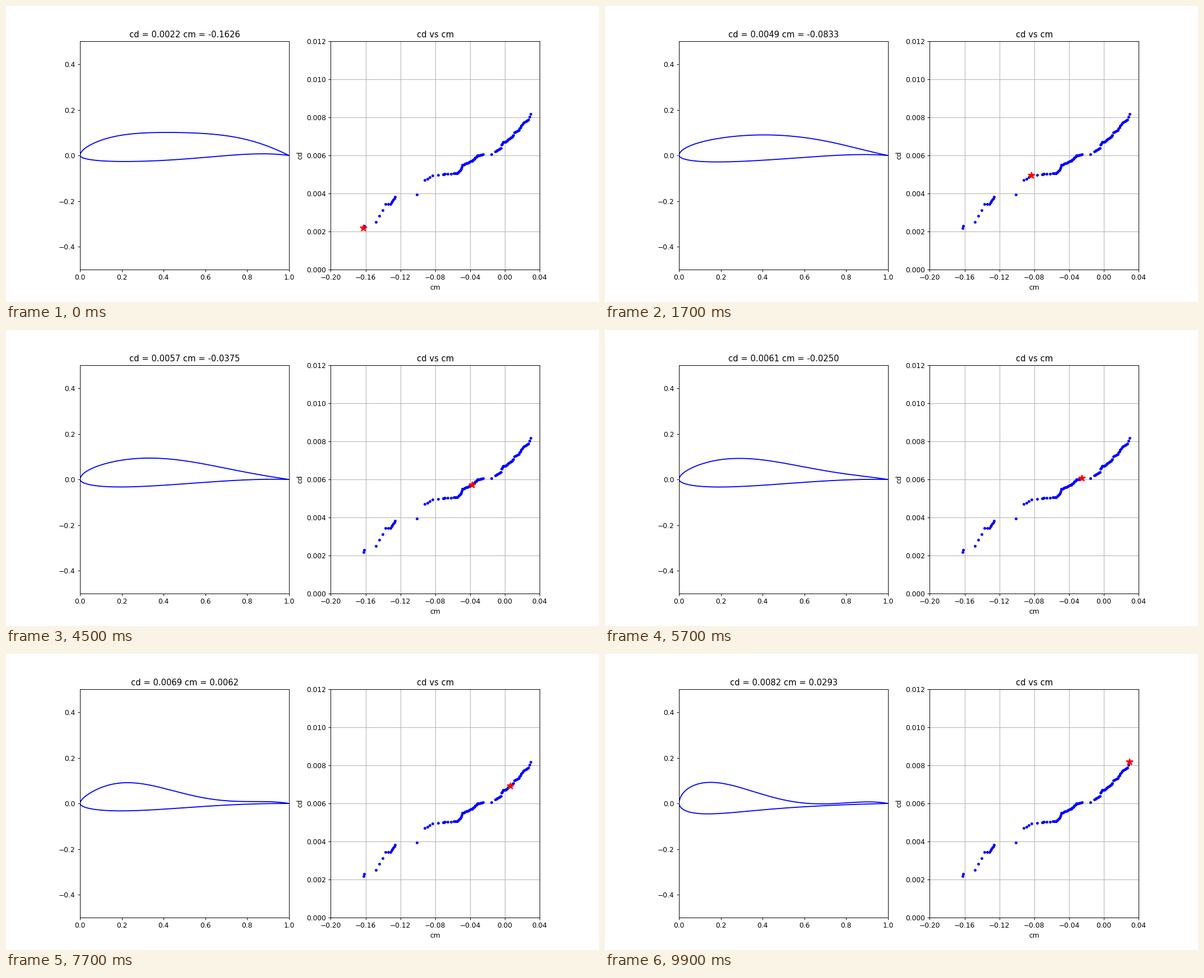
A matplotlib script for the animation above (10 s loop, 1058x529 px).

```python
import numpy as np
import matplotlib.pyplot as plt
from matplotlib.animation import FuncAnimation

FRAMES = 100

# Corners of the Pareto front: (index, cm in 1e-4, cd in 1e-5);
# the points in between are evenly spaced.
CORNERS = np.array([
    (0, -1626, 218), (1, -1618, 230), (2, -1483, 251), (5, -1369, 343),
    (7, -1313, 345), (12, -1261, 381), (13, -1012, 394), (14, -921, 470),
    (17, -833, 493), (19, -706, 500), (22, -689, 503), (25, -588, 505),
    (28, -545, 506), (33, -500, 530), (35, -490, 549), (45, -375, 572),
    (52, -313, 599), (57, -250, 606), (58, -155, 606), (59, -110, 621),
    (65, -47, 638), (66, -42, 655), (69, -21, 670), (71, 6, 671),
    (81, 99, 706), (82, 106, 721), (86, 159, 733), (91, 209, 770),
    (97, 273, 788), (99, 293, 819),
])
index, corner_cm, corner_cd = CORNERS.T
cm = np.interp(range(FRAMES), index, corner_cm) * 1e-4
cd = np.interp(range(FRAMES), index, corner_cd) * 1e-5

# Key designs: front index -> shape function of the upper and lower side,
# sampled evenly from nose to tail.
DESIGNS = {
    0: ([.20, .2535, .283, .365, .45], [-.092, -.063, -.011, .13]),
    17: ([.19, .22, .2475, .249, .18], [-.106, -.063, -.015, .075]),
    45: ([.205, .2413, .232, .183, .14], [-.118, -.075, -.03, .03]),
    69: ([.185, .2493, .1513, .067, .15], [-.118, -.076, -.031, .008]),
    86: ([.18, .2333, .0877, .016, .17], [-.107, -.072, -.033, -.002]),
    99: ([.34, .214, .045, 0, .17], [-.20, -.087, -.04, -.016]),
}

chord = (1 - np.cos(np.linspace(0, np.pi, 120))) / 2


def surface(shape):
    """Class-shape transformation: round nose, sharp tail."""
    stations = np.linspace(0, 1, len(shape))
    poly = np.polyfit(stations, shape, len(shape) - 1)
    return np.sqrt(chord) * (1 - chord) * np.polyval(poly, chord)


# Closed outline: tail, upper side, nose, lower side.
outline_x = np.r_[chord[::-1], chord[1:]]
outlines = [np.r_[surface(up)[::-1], surface(low)[1:]]
            for up, low in DESIGNS.values()]
design_cm = cm[list(DESIGNS)]


def outline(i):
    k = np.clip(np.searchsorted(design_cm, cm[i]), 1, len(design_cm) - 1)
    t = (cm[i] - design_cm[k - 1]) / (design_cm[k] - design_cm[k - 1])
    return (1 - t) * outlines[k - 1] + t * outlines[k]


fig, (ax_foil, ax_front) = plt.subplots(1, 2, figsize=(12, 6), dpi=88.167)

foil, = ax_foil.plot(outline_x, outline(0), "b-")
ax_foil.set(xlim=(0, 1), ylim=(-0.5, 0.5))
title = ax_foil.set_title("")

ax_front.plot(cm, cd, "b.")
star, = ax_front.plot([], [], "r*", markersize=10, markeredgewidth=1.5)
ax_front.set(xlim=(-0.2, 0.04), ylim=(0, 0.012), xlabel="cm", ylabel="cd",
             title="cd vs cm")
ax_front.set_xticks(np.linspace(-0.2, 0.04, 7))
ax_front.grid(True)


def update(i):
    foil.set_ydata(outline(i))
    star.set_data([cm[i]], [cd[i]])
    title.set_text(f"cd = {cd[i]:.4f} cm = {cm[i]:.4f}")
    return foil, star, title


anim = FuncAnimation(fig, update, frames=FRAMES, interval=100, repeat=True,
                     repeat_delay=0)
plt.show()
```
